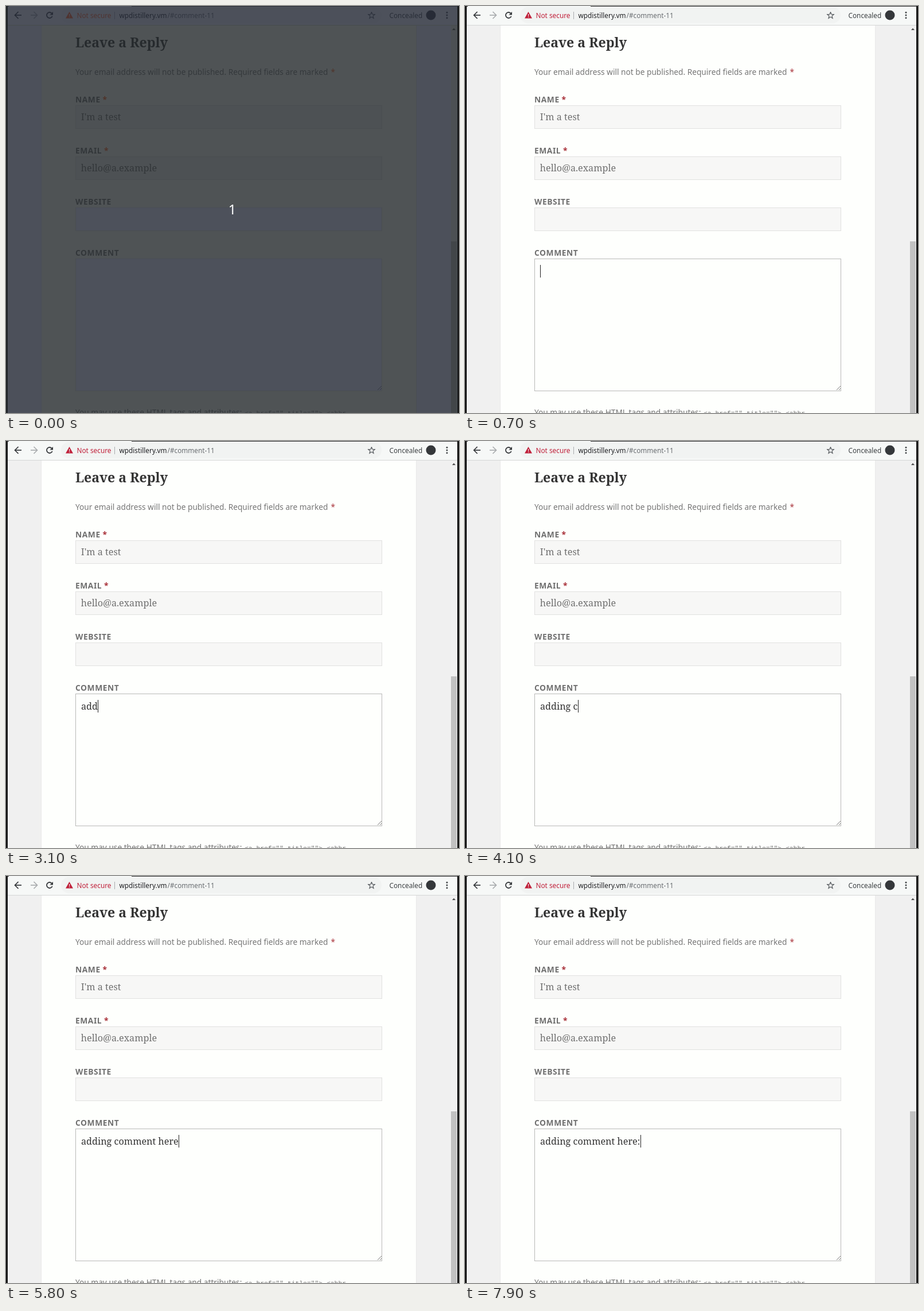
Animation of 790x709 px, one loop 8 s. Source, as an HTML page with a canvas:

```html
<!DOCTYPE html>
<html lang="en">
<head>
<meta charset="utf-8">
<title>Comment form</title>
<style>
html, body { margin: 0; width: 790px; height: 709px; overflow: hidden; }
canvas { display: block; }
</style>
</head>
<body>
<canvas id="stage" width="790" height="709"></canvas>
<script>
const W = 790, H = 709, LOOP = 8000;
const ctx = document.getElementById('stage').getContext('2d');
const SANS = '"Noto Sans", sans-serif';
const SERIF = '"Noto Serif", serif';
const MONO = '"Liberation Mono", monospace';
const MESSAGE = 'adding comment here:';

// [time, letters typed, caret x or 0 when hidden]
const STEPS = [
  [700, 0, 131], [1300, 0, 0], [1900, 0, 131],
  [2500, 1, 140], [2800, 2, 150], [3100, 3, 160],
  [3400, 4, 165], [3500, 5, 175], [3700, 7, 188], [4100, 8, 197],
  [4400, 10, 222], [4600, 11, 238], [4700, 12, 246], [4800, 13, 256],
  [5000, 15, 265], [5400, 16, 276],
  [5600, 17, 284], [5700, 18, 292], [5800, 19, 301],
  [6400, 19, 0], [6700, 20, 306], [7300, 20, 0], [7900, 20, 306]
];

function box(x, y, w, h, color) {
  ctx.fillStyle = color;
  ctx.fillRect(x, y, w, h);
}

function text(str, x, y, font, color, spacing = '0px') {
  ctx.font = font;
  ctx.letterSpacing = spacing;
  ctx.fillStyle = color;
  ctx.fillText(str, x, y);
}

function dot(x, y, r, color) {
  ctx.fillStyle = color;
  ctx.beginPath();
  ctx.arc(x, y, r, 0, Math.PI * 2);
  ctx.fill();
}

function line(points, color, width = 1) {
  ctx.strokeStyle = color;
  ctx.lineWidth = width;
  ctx.beginPath();
  points.forEach(([x, y]) => ctx.lineTo(x, y));
  ctx.stroke();
}

function field(y, h, fill, border) {
  box(121, y, 535, h, border);
  box(122, y + 1, 533, h - 2, fill);
}

function arrow(x, dir, color) {
  line([[x - 6 * dir, 16], [x + 5.5 * dir, 16]], color, 1.7);
  line([[x, 10], [x - 6 * dir, 16], [x, 22]], color, 1.7);
}

function reload() {
  ctx.strokeStyle = '#35383b';
  ctx.lineWidth = 1.8;
  ctx.beginPath();
  ctx.arc(76, 16, 5, 0.35, Math.PI * 1.75);
  ctx.stroke();
  ctx.fillStyle = '#35383b';
  ctx.beginPath();
  ctx.moveTo(82, 10);
  ctx.lineTo(82, 15.5);
  ctx.lineTo(76.5, 15.5);
  ctx.fill();
}

function warning(color) {
  ctx.fillStyle = color;
  ctx.beginPath();
  ctx.moveTo(110.5, 10);
  ctx.lineTo(117, 21.5);
  ctx.lineTo(104, 21.5);
  ctx.fill();
  box(110, 14, 1.2, 3.5, '#f1f3f2');
  box(110, 18.5, 1.2, 1.3, '#f1f3f2');
}

function star() {
  const pts = [];
  for (let i = 0; i <= 10; i++) {
    const a = -Math.PI / 2 + i * Math.PI / 5, r = i % 2 ? 2.6 : 6;
    pts.push([637.5 + r * Math.cos(a), 16.5 + r * Math.sin(a)]);
  }
  line(pts, '#55595d', 1.2);
}

function toolbar(red) {
  box(0, 0, W, 33, '#f6f8f7');
  ctx.fillStyle = '#f1f3f2';
  ctx.beginPath();
  ctx.roundRect(96, 2, 559, 28, 14);
  ctx.fill();
  box(0, 33, W, 1, '#d4d6d5');
  box(219, 0, 569, 1, '#2b2b2b');
  box(0, 0, 5, 1, '#2b2b2b');

  arrow(21.5, 1, '#35383b');
  arrow(48.5, -1, '#aaadaf');
  reload();
  warning(red);
  const font = '11.8px ' + SANS;
  text('Not secure', 123.5, 20.5, font, red);
  box(189, 10, 1, 13, '#a9acae');
  text('wpdistillery.vm', 197.5, 20.5, font, '#202124');
  text('/#comment-11', 281.5, 20.5, font, '#6a6e72');
  star();
  text('Concealed', 668.5, 20.5, font, '#3c4043');
  dot(741, 16, 8.5, '#35383b');
  for (const y of [11.2, 16, 20.8]) dot(769, y, 1.5, '#45484b');
}

function label(str, y, starX, red) {
  const font = 'bold 13.8px ' + SANS;
  text(str, 121, y, font, '#707070', '0.55px');
  if (starX) text('*', starX, y, font, red);
}

function page(focus, red) {
  box(0, 34, W, H - 34, '#f0f0f0');
  box(61, 34, 655, H - 34, '#e9e9e9');
  box(62, 34, 653, H - 34, '#fefffd');

  text('Leave a Reply', 121, 72, 'bold 23.1px ' + SERIF, '#333');
  const note = '13.7px ' + SANS;
  text('Your email address will not be published. Required fields are marked',
    121, 120, note, '#767676');
  text('*', 566.5, 120, note, red);

  label('NAME', 168, 168.5, red);
  label('EMAIL', 257, 171, red);
  label('WEBSITE', 346);
  label('COMMENT', 435);

  const fill = '#f7f7f6', edge = '#e1e1e0';
  field(173, 41, fill, edge);
  field(262, 41, fill, edge);
  field(351, 41, fill, edge);
  field(440, 231, focus ? '#fefffd' : fill, focus ? '#b9b9b8' : edge);
  const entry = '16.2px ' + SERIF;
  text("I'm a test", 130.7, 199, entry, '#707070');
  text('hello@a.example', 130.7, 288, entry, '#707070');
  line([[648, 669], [655, 662]], '#777');
  line([[652, 669], [655, 666]], '#777');

  text('You may use these HTML tags and attributes:', 121, 713, note, '#767676');
  text('<a href="" title=""> <abbr', 416, 713, '11.35px ' + MONO, '#767676');

  // scrollbar
  box(776, 34, 12, H - 34, '#f1f1f1');
  box(776, 410, 10, H - 410, '#c1c1c1');
  ctx.fillStyle = '#505050';
  ctx.beginPath();
  ctx.moveTo(778, 42);
  ctx.lineTo(781, 38.5);
  ctx.lineTo(784, 42);
  ctx.fill();
}

function countdown() {
  box(0, 0, 788, H, 'rgba(36, 41, 44, 0.8)');
  // cool tint on the grey areas
  ctx.globalCompositeOperation = 'lighter';
  const tint = 'rgb(0, 0, 7)';
  box(3, 0, 784, 33, tint);
  box(3, 34, 59, H - 34, tint);
  box(716, 34, 60, H - 34, tint);
  box(122, 351, 533, 40, tint);
  box(122, 440, 533, 230, tint);
  ctx.globalCompositeOperation = 'source-over';
  ctx.textAlign = 'center';
  text('1', 394.5, 363, '24px ' + SANS, '#fff');
  ctx.textAlign = 'left';
}

function draw(t) {
  const step = STEPS.filter(s => s[0] <= t).pop();
  const dark = t < 100;
  page(!!step, dark ? '#ff6020' : '#a83038');
  toolbar(dark ? '#ff6020' : '#c0203a');
  box(0, 0, 3, H, '#161616');
  box(787, 0, 3, H, '#161616');
  if (step) {
    const [, count, caret] = step;
    text(MESSAGE.slice(0, count), 131, 468, '16.2px ' + SERIF, '#333');
    if (caret) box(caret, 451, 1, 22, '#222');
  }
  if (dark) countdown();
}

function tick() {
  draw(performance.now() % LOOP);
  requestAnimationFrame(tick);
}
tick();
</script>
</body>
</html>
```
